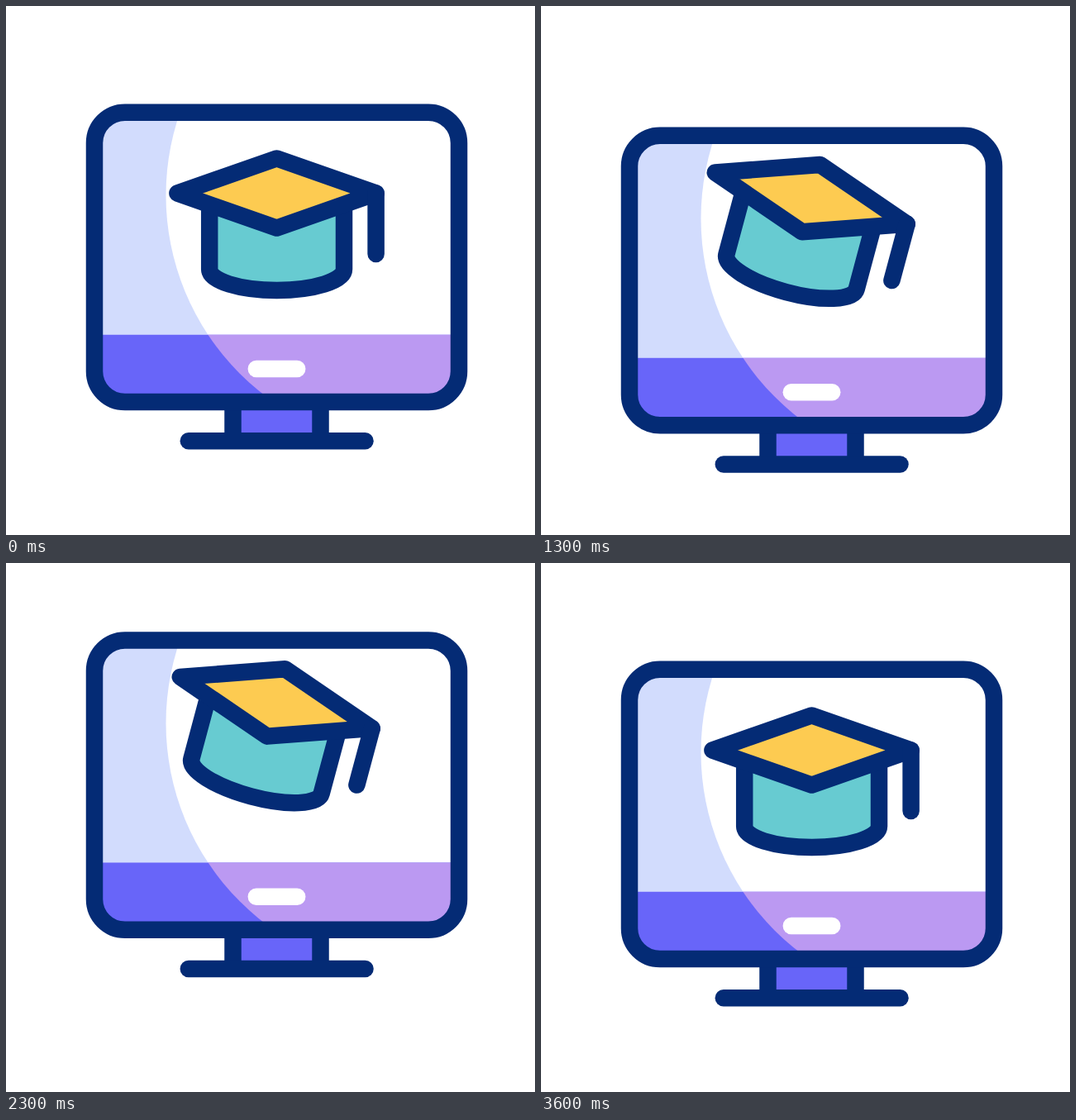
These frames come from a looping animation (640x640 px, 3.62 s). An HTML page:

```html
<!DOCTYPE html>
<html lang="en">
<head>
<meta charset="utf-8">
<title>Online learning</title>
<style>
  html, body { margin: 0; width: 100%; height: 100%; overflow: hidden; background: #fff; }
  svg { display: block; width: 100vw; height: 100vh; }
  .line { fill: none; stroke: #042b75; stroke-width: 20.5; stroke-linecap: round; stroke-linejoin: round; }
  .butt { stroke-linecap: butt; }
</style>
</head>
<body>
<svg viewBox="0 0 640 640">
  <defs>
    <clipPath id="screen"><rect x="107" y="128.7" width="441" height="350.4" rx="37"/></clipPath>
    <clipPath id="bar"><rect x="107" y="397.7" width="441" height="82"/></clipPath>
  </defs>
  <g id="monitor">
    <rect x="274.5" y="479" width="106" height="47" fill="#6865f9"/>
    <path class="line butt" d="M274.5 479V526M380.5 479V526"/>
    <path class="line" d="M220.8 526.3H434.5"/>
    <g clip-path="url(#screen)">
      <rect x="107" y="128" width="441" height="352" fill="#d2dcfd"/>
      <circle cx="498.5" cy="229" r="305" fill="#fff"/>
      <g clip-path="url(#bar)">
        <rect x="107" y="397" width="441" height="83" fill="#6865f9"/>
        <circle cx="498.5" cy="229" r="305" fill="#bb99f2"/>
      </g>
    </g>
    <rect class="line" x="107" y="128.7" width="441" height="350.4" rx="37"/>
    <path class="line" style="stroke:#fff" d="M302.8 439H352.2"/>
    <g id="cap">
      <path class="line butt" style="fill:#67cbd1" d="M246.2 240V318.5A81.4 25.4 0 0 0 409 318.5V240"/>
      <path class="line" style="fill:#fdcb51" d="M207.4 226.5L327.5 184.4L447.6 226.5L327.5 268.6Z"/>
      <line class="line" id="tassel" x1="447.6" y1="226.5"/>
    </g>
  </g>
</svg>
<script>
  const LOOP = 3620, BEAT = 600;
  const [monitor, cap, tassel] = ['monitor', 'cap', 'tassel'].map(id => document.getElementById(id));

  // smooth step from 0 to 1, held outside that range
  function ease(x) {
    const u = Math.min(Math.max(x, 0), 1);
    return u * u * (3 - 2 * u);
  }

  function draw(ms) {
    const beat = Math.min(ms % LOOP, 6 * BEAT) / BEAT;
    const half = beat / 2;

    const drift = 29.5 * ease(half) - 66.1 * ease(half - 1) + 36.6 * ease(half - 2);
    const bounce = 25.6 * (ease(beat) - 2 * ease(beat - 1) + 2 * ease(beat - 2) - 2 * ease(beat - 3) + ease(beat - 4));
    const tilt = 15 * (ease(beat) - ease(beat - 4));
    const pull = ease(1 - Math.abs(beat % 2 - 1));

    monitor.setAttribute('transform', `translate(0 ${drift})`);
    cap.setAttribute('transform', `translate(0 ${bounce}) rotate(${tilt} 328.3 223.5)`);
    tassel.setAttribute('x2', 447.6 - 0.6 * pull);
    tassel.setAttribute('y2', 300 - 35.8 * pull);
  }

  const start = performance.now();
  function tick() {
    draw(performance.now() - start);
    requestAnimationFrame(tick);
  }
  tick();
</script>
</body>
</html>
```
